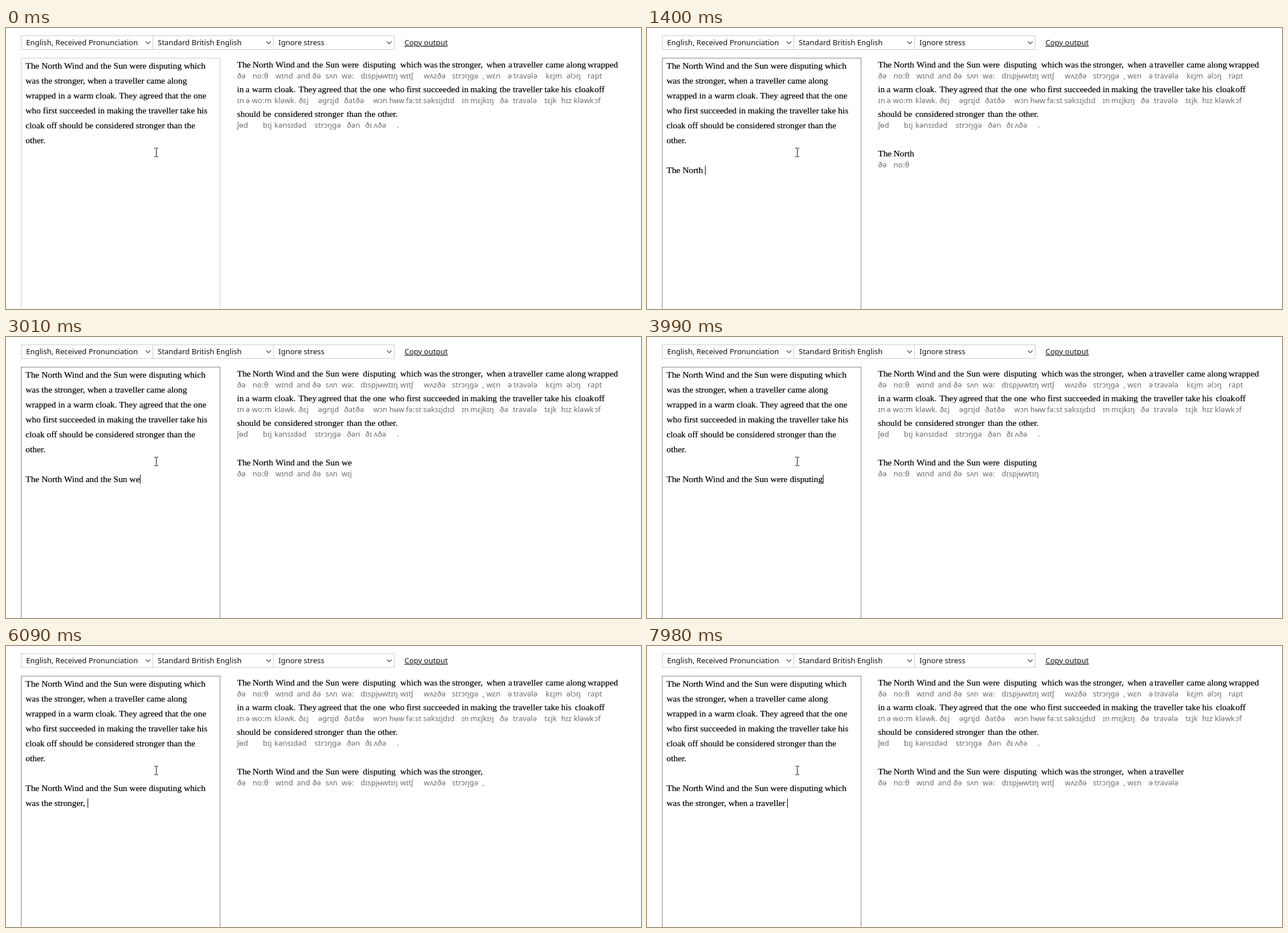
Recreate the animation shown at these times as an HTML page. Size 1105 px wide and 490 px high, loop 8000 ms.

```html
<!DOCTYPE html>
<html lang="en">
<head>
<meta charset="utf-8">
<title>Phonetic transcription</title>
<style>
html, body { margin: 0; width: 100%; height: 100%; overflow: hidden; background: #fff; }
svg { display: block; width: 1105px; height: 490px; }
text { white-space: pre; }
.ui { font: 13px "Noto Sans", sans-serif; fill: #111; }
.serif { font: 15.36px "Liberation Serif", serif; fill: #000; stroke: #000; stroke-width: .2px; }
.ipa { font: 13px "Noto Sans", sans-serif; fill: #6e6e6e; }
.link { text-decoration: underline; }
.box { fill: #fff; stroke: #ccc; }
.line { fill: none; stroke: #555; stroke-width: 1.3px; }
.beam { fill: none; stroke: #111; }
</style>
</head>
<body>
<svg id="stage" viewBox="0 0 1105 490"></svg>
<script>
const LOOP = 8000, STEP = 70, TOP = 52;
const stage = document.getElementById("stage");

function add(tag, attrs, text = "") {
  const el = document.createElementNS("http://www.w3.org/2000/svg", tag);
  for (const key in attrs) el.setAttribute(key, attrs[key]);
  el.textContent = text;
  return stage.appendChild(el);
}
const write = (cls, x, y, text) => add("text", { class: cls, x, y }, text);

const pen = document.createElement("canvas").getContext("2d");
function widthOf(text, cls) {
  pen.font = cls === "ipa" ? '13px "Noto Sans", sans-serif' : '15.36px "Liberation Serif", serif';
  return pen.measureText(text).width;
}

// Top bar
const selects = [
  [26, 230, "English, Received Pronunciation"],
  [255, 211, "Standard British English"],
  [465, 211, "Ignore stress"]
];
for (const [x, w, label] of selects) {
  add("rect", { class: "box", x: x + .5, y: 13.5, width: w - 1, height: 24 });
  write("ui", x + 9, 30, label);
  add("path", { class: "line", d: `M${x + w - 13} 23.5l4 4l4-4` });
}
write("ui link", 693.5, 30, "Copy output");

// Input area
const area = add("rect", { class: "box", x: 26.5, y: TOP + .5, width: 346, height: 460 });
[
  "The North Wind and the Sun were disputing which",
  "was the stronger, when a traveller came along",
  "wrapped in a warm cloak. They agreed that the one",
  "who first succeeded in making the traveller take his",
  "cloak off should be considered stronger than the",
  "other."
].forEach((text, i) => write("serif", 34, 71 + 26 * i, text));
const typed = [write("serif", 34, 253, ""), write("serif", 34, 279, "")];
const caret = add("rect", { width: 1, height: 16, fill: "#000" });
add("path", { class: "beam", d: "M258 209.5h3M262 209.5h3M261.5 210v14M258 224.5h3M262 224.5h3" });

// Word entries: text|x|transcription|transcription x
const parse = row => row.split(" ").map(entry => {
  const [text, x, ipa, ipaX] = entry.split("|");
  return { text, x: +x, ipa, ipaX: +(ipaX || x) };
});
const first = parse("The|402|ðə North|429|noːθ Wind|469|wɪnd and|506|and the|533|ðə Sun|556|sʌn " +
  "were|584|wəː disputing|621|dɪspjʉwtɪŋ|617 which|686|wɪtʃ was|727|wʌz the|754|ðə|750 " +
  "stronger,|776|strɔŋɡə when|836|wɛn a|874|ə|873 traveller|883|travələ came|939|kɛjm " +
  "along|975|əlɔŋ wrapped|1012|rapt |829|,");
const second = parse("in|402|ɪn a|417|ə warm|428|woːm cloak.|467|kləwk. They|509|ðɛj agreed|543|əɡrɪjd " +
  "that|588|ðat the|616|ðə|608 one|639|wɔn who|667|hʉw first|697|fəːst|696 succeeded|726|səksɪjdɪd " +
  "in|793|ɪn making|808|mɛjkɪŋ the|859|ðə traveller|882|travələ take|937|tɛjk his|966|hɪz " +
  "cloak|990|kləwk|988 off|1024|ɔf");
const third = parse("should|402|ʃɵd be|447|bɪj considered|467|kənsɪdəd stronger|537|strɔŋɡə " +
  "than|593|ðən the|624|ðɪ|625 other.|647|ʌðə|640 |680|.");
[first, second, third].forEach((row, i) => {
  for (const w of row) {
    write("serif", w.x, 69 + 43 * i, w.text);
    write("ipa", w.ipaX, 88 + 43 * i, w.ipa);
  }
});

// Transcriptions of unfinished words, one per typed letter
const W = "dʌbəljʉw", WH = W + "ɛjtʃ", T = "tɪj", TH = T + "ɛjtʃ";
const partial = {
  The: [T, TH], North: ["ɛn", "nəw", "noː", "noːt"], Wind: [W, "wɪj", "wɪn"],
  and: ["ə", "an"], the: [T, TH], Sun: ["ɛs", "sʉw"], were: [W, "wɪj", "wəː"],
  disputing: ["dɪj", "dɪ", "dɪs", "dɪsp", "dɪspjʉw", "dɪspjʉwt", "dɪspjʉwtɪ", "dɪspjʉwtɪn"],
  which: [W, WH, "wɪ", "wɪk"], was: [W, "wa"],
  "stronger,": ["ɛs", "st", "str", "strəw", "strɔn", "strɔŋ", "strɔnd͡ʒ", "strɔŋɡə"],
  when: [W, WH, "wɛ"], a: [],
  traveller: [T, "tɪjɑː", "tra", "trav", "trɛjv", "travɛl", "travɛl", "travələ"]
};
const words = first.slice(0, 15);
const story = words.map(w => w.text).join(" ") + " ";
const WRAP = story.indexOf("was");
const COMMA = story.indexOf(",");
let start = 0;
for (const w of words) {
  w.start = start;
  start += w.text.length + 1;
  w.top = write("serif", w.x, 224, "");
  w.low = write("ipa", w.ipaX, 243, "");
}
const comma = write("ipa", 829, 243, "");

// Time and number of typed letters
const keys = [[210, 0], [840, 5], [1400, 10], [1680, 14], [2520, 24], [3010, 29], [3360, 33],
  [3990, 41], [4200, 44], [5040, 53], [5320, 57], [5880, 63], [6090, 66], [6510, 66],
  [6720, 68], [7560, 78], [7980, 83]];
function lettersAt(t) {
  if (t <= keys[0][0]) return 0;
  for (let i = 1; i < keys.length; i++) {
    const [t0, n0] = keys[i - 1], [t1, n1] = keys[i];
    if (t <= t1) return Math.floor(n0 + (n1 - n0) * (t - t0) / (t1 - t0) + 1e-6);
  }
  return story.length;
}

function placeCaret(t, n) {
  let x = 34, y = 240;
  if (t < 140) {
    x += widthOf("other.");
    y = 188;
  } else if (t < 210) {
    y = 214;
  } else if (n > WRAP) {
    x += widthOf(story.slice(WRAP, n));
    y = 266;
  } else {
    x += widthOf(story.slice(0, n));
  }
  caret.setAttribute("x", Math.round(x));
  caret.setAttribute("y", y);
  caret.setAttribute("visibility", t < STEP ? "hidden" : "visible");
}

function showOutput(n) {
  words.forEach((w, i) => {
    const count = Math.max(0, Math.min(w.text.length, n - w.start));
    const text = w.text.slice(0, count);
    const ipa = count ? partial[w.text][count - 1] || w.ipa : "";
    const prev = words[i - 1];
    const afterThe = prev && /^the$/i.test(prev.text) && ipa[0] === "ɛ";
    if (afterThe) prev.low.textContent = "ðɪ";
    const slack = Math.max(0, widthOf(ipa, "ipa") - widthOf(text));
    const full = count === w.text.length;
    w.top.setAttribute("x", full || afterThe ? w.x : w.ipaX + slack / 2);
    w.low.setAttribute("x", afterThe ? prev.ipaX + 15.5 : w.ipaX);
    w.top.textContent = text;
    w.low.textContent = ipa;
  });
  comma.textContent = n > COMMA ? "," : "";
}

function render(now) {
  const t = Math.floor(now % LOOP / STEP) * STEP;
  const n = lettersAt(t);
  area.style.stroke = t < STEP ? "#ccc" : "#858585";
  typed[0].textContent = story.slice(0, Math.min(n, WRAP));
  typed[1].textContent = story.slice(WRAP, Math.max(n, WRAP));
  placeCaret(t, n);
  showOutput(n);
}

const begin = performance.now();
function tick() {
  render(performance.now() - begin);
  requestAnimationFrame(tick);
}
tick();
</script>
</body>
</html>
```
